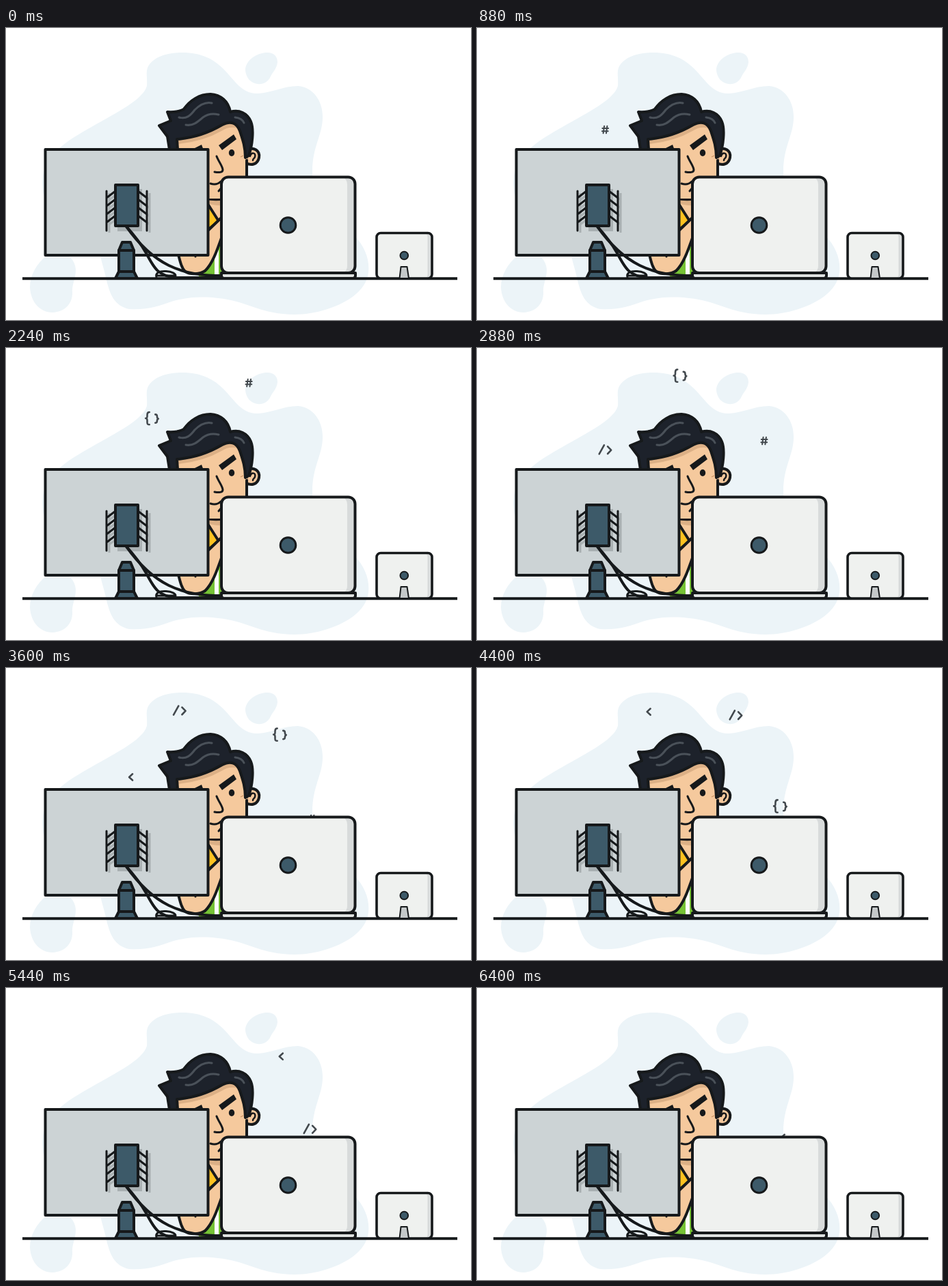
Write an HTML page that moves like this. It is 680x428 px and loops after 6680 ms.

```html
<!DOCTYPE html>
<html lang="en">
<head>
<meta charset="utf-8">
<title>Developer at work</title>
<style>
  html, body { margin: 0; width: 100%; height: 100%; overflow: hidden; background: #fff; }
  svg { display: block; width: 680px; height: 428px; }
  .line { fill: none; stroke: #16191b; stroke-width: 4; stroke-linecap: round; stroke-linejoin: round; }
  .thin { stroke-width: 3; }
  .fine { stroke-width: 2.5; }
  .blob { fill: #ecf4f8; }
  .skin { fill: #f5c99d; }
  .tan { fill: #dcb086; }
  .steel { fill: #3d5a69; }
  .pale { fill: #eff1ef; }
  .shade { fill: #d8dbdb; }
  .shadow { fill: none; stroke: #a9b0b2; stroke-width: 3; }
  .ink { fill: #16191b; }
  .shine { fill: none; stroke: #4a5159; stroke-width: 3; stroke-linecap: round; }
  .code { fill: none; stroke: #42484d; stroke-width: 2.6; stroke-linecap: round; stroke-linejoin: round; }
</style>
</head>
<body>
<svg viewBox="0 0 680 428">
  <defs>
    <path id="fins" d="M147 239V297M206 239V297
      M160 239L147 249M160 251L147 261M160 263L147 273M160 275L147 285
      M193 239L206 249M193 251L206 261M193 263L206 273M193 275L206 285"/>
  </defs>

  <g class="blob">
    <path d="M53 225C55 185 90 165 125 145C165 122 200 105 206 85C207 70 203 62 210 53C222 38 245 36 258 36
      C285 36 303 45 318 60C334 76 345 97 368 96C390 95 405 85 427 85C450 87 464 108 463 133
      C462 158 448 175 448 210C448 250 480 280 505 300C525 318 532 340 530 358C527 385 500 402 470 412
      C445 420 425 421 405 419C365 415 350 400 310 396C285 393 262 395 242 401C225 407 205 414 180 412
      C158 407 152 390 147 370C143 350 138 340 138 330L100 290C70 280 52 255 53 225Z"/>
    <path d="M60 333C45 345 35 362 35 380C36 402 50 417 68 417C87 416 97 403 97 389C96 375 102 368 102 354C101 340 92 332 80 330Z"/>
    <path d="M350 62C350 50 362 38 380 36C392 35 397 42 397 50C396 60 390 64 387 71C383 80 375 83 368 82C357 81 351 72 350 62Z"/>
  </g>

  <g id="symbols" class="code">
    <path stroke-width="2" d="M-1.4-5.3L-2.9 5.3M2.9-5.3L1.4 5.3M-4.2-2H4.6M-4.6 2.2H4.2"/>
    <path d="M-3.8-9C-6.6-9-7-7.5-7-5V-3Q-7 0-9.3 0Q-7 0-7 3V6C-7 8.6-6.4 9.3-3.8 9.3
      M4.8-5.6Q7.4-5.6 7.4-3Q7.4 .2 9.3 .7Q7.4 1.2 7.4 4Q7.4 6.8 4.8 6.8"/>
    <path d="M-8.8 6.3L-1.6-6.6M3.6-4.6L8.7 .6L3.6 6"/>
    <path d="M2.6-4.6L-2.4 0L2.6 4.6"/>
  </g>

  <!-- body and arm -->
  <path class="skin" d="M290 240H325V300H290Z"/>
  <path class="tan" d="M290 250H325V259Q305 263 290 254Z"/>
  <path class="line" fill="none" d="M290 249Q305 253 320 250"/>
  <path class="line" style="fill:#fdc221" d="M290 250L311 283L290 300Z"/>
  <path style="fill:#76c335" d="M280 367L318 300V367Z"/>
  <path style="fill:#fff" d="M305 325L311 312V364H305Z"/>
  <path class="line skin" style="fill:#f5c99d" d="M252 332C255 344 257 352 262 357C270 362 284 361 291 356C302 346 309 325 317 302V276L290 302L270 332Z"/>
  <path class="line thin" d="M277 332V335"/>

  <!-- head -->
  <path class="line skin" style="fill:#f5c99d" d="M352 179C362 173 372 180 370 190C368 200 359 202 351 198Z"/>
  <path class="line fine" d="M357 188C359 181 366 183 364 189C363 192 361 191 361 194"/>
  <path class="skin" d="M251 155L344 134L353 180V225L330 250H285L251 205Z"/>
  <path class="line" d="M352 194V222"/>
  <path class="tan" d="M252 162Q300 154 322 139L340 138L345 150Q330 141 315 151Q289 166 252 170Z"/>
  <path class="line" style="fill:#1d222b" d="M251 178H239L236 159L224 143L241 136L236 123Q251 124 260 119C269 106 283 97 299 97
    C314 98 325 107 328 123C341 119 353 125 358 137C363 149 360 173 355 187L350 190C350 174 346 163 342 151
    C337 138 328 136 316 142C299 152 276 161 250 163Z"/>
  <path class="shine" d="M253 131C264 134 270 128 276 120C284 112 292 108 301 110M263 142C273 144 280 138 288 131C296 125 303 125 311 127M335 131Q345 132 348 139"/>
  <path class="ink" d="M311 172L333 156L337 163L316 179ZM276 176L286 171L289 179H276Z"/>
  <ellipse class="ink" cx="330" cy="183" rx="4.2" ry="5"/>
  <path class="line thin" d="M308 188C311 196 317 203 317 208C317 212 311 212 305 211M299 228Q308 231 314 225M311 239L316 233"/>
  <path d="M343 189L347 187" stroke="#c89363" stroke-width="1.2"/>

  <!-- desk and monitor -->
  <path class="line" style="stroke-linecap:butt" d="M24 367.3H660"/>
  <rect class="line" style="fill:#ccd3d5" x="57.5" y="178" width="238" height="155"/>
  <use class="shadow" href="#fins" x="4" y="3"/>
  <rect x="163" y="236" width="36" height="62" fill="#a9b0b2"/>
  <use class="line thin" href="#fins"/>
  <rect class="line steel" style="fill:#3d5a69" x="160" y="230" width="33" height="60"/>
  <path class="line" d="M176 291C188 304 197 316 205 330C217 353 223 364 250 366H316"/>
  <path class="line" d="M176 291C195 318 214 336 238 348C265 361 290 363 318 363"/>
  <path class="line thin" d="M220 366C218 358 225 356 234 356.500C243 357 248 360 248 363H222"/>
  <g class="line" style="fill:#3d5a69">
    <path d="M170 314H182L187 326H165Z"/>
    <path d="M165 326H187V357H165Z"/>
    <path d="M165 357H187L192 367H160Z"/>
  </g>

  <!-- laptop -->
  <path class="line" style="fill:#dfe2e1" d="M315 359H511V363Q511 367 507 367H319Q315 367 315 363Z"/>
  <rect class="pale" x="315" y="218.500" width="195.500" height="140.500" rx="10"/>
  <path class="shade" d="M488 218.500H500Q510.500 218.500 510.500 229V348Q510.500 359 500 359H488Q499 359 499 348V230Q499 218.500 488 218.500Z"/>
  <rect class="line" x="315" y="218.500" width="195.500" height="140.500" rx="10"/>
  <circle class="line thin" style="fill:#3d5a69" cx="412.500" cy="289" r="11.300"/>

  <!-- tablet -->
  <rect class="pale" x="542" y="300.500" width="81" height="66.500" rx="6"/>
  <path class="shade" d="M611 300.500H617Q623 300.500 623 307V361Q623 367 617 367H611Q616.500 367 616.500 361V307Q616.500 300.500 611 300.500Z"/>
  <rect class="line" style="stroke-width:3.600" x="542" y="300.500" width="81" height="66.500" rx="6"/>
  <circle class="line" style="fill:#3d5a69;stroke-width:2" cx="582.300" cy="333.500" r="5.800"/>
  <path class="line" style="fill:#c5c9ca;stroke-width:2" d="M577.500 350H586.500L589 367H575.500Z"/>
</svg>

<script>
  const LOOP = 6680, STEP = 40;
  const DELAYS = [0, 1000, 2000, 2820];

  // Shared arc over the head: time, x, y
  const ARC = [
    [400, 171, 198], [560, 174, 182], [880, 187.5, 149], [1200, 210, 108],
    [1520, 243, 70], [1880, 297, 40.5], [2080, 330, 38], [2400, 378.5, 69],
    [2600, 400.5, 97.500], [2880, 420, 136], [3240, 437, 184],
    [3420, 444, 204.500], [3600, 447.500, 221], [3760, 449, 232]
  ];

  const slope = (i, k) => {
    const a = ARC[Math.max(i - 1, 0)], b = ARC[Math.min(i + 1, ARC.length - 1)];
    return (b[k] - a[k]) / (b[0] - a[0]);
  };

  function pointAt(t) {
    const i = ARC.findIndex((p, n) => n < ARC.length - 1 && t >= p[0] && t < ARC[n + 1][0]);
    if (i < 0) return null;
    const a = ARC[i], b = ARC[i + 1], d = b[0] - a[0], u = (t - a[0]) / d;
    const s = u * u * (3 - 2 * u);
    return [1, 2].map(k =>
      a[k] + (b[k] - a[k]) * s + d * u * (1 - u) * (slope(i, k) * (1 - u) - slope(i + 1, k) * u));
  }

  const symbols = [...document.getElementById("symbols").children];
  const start = performance.now();

  function draw(now) {
    const time = Math.floor((Math.max(0, now - start) % LOOP) / STEP) * STEP;
    symbols.forEach((el, i) => {
      const p = pointAt(time - DELAYS[i]);
      el.style.display = p ? "" : "none";
      if (p) el.setAttribute("transform", `translate(${p[0].toFixed(2)} ${p[1].toFixed(2)})`);
    });
    requestAnimationFrame(draw);
  }
  draw(start);
</script>
</body>
</html>
```
